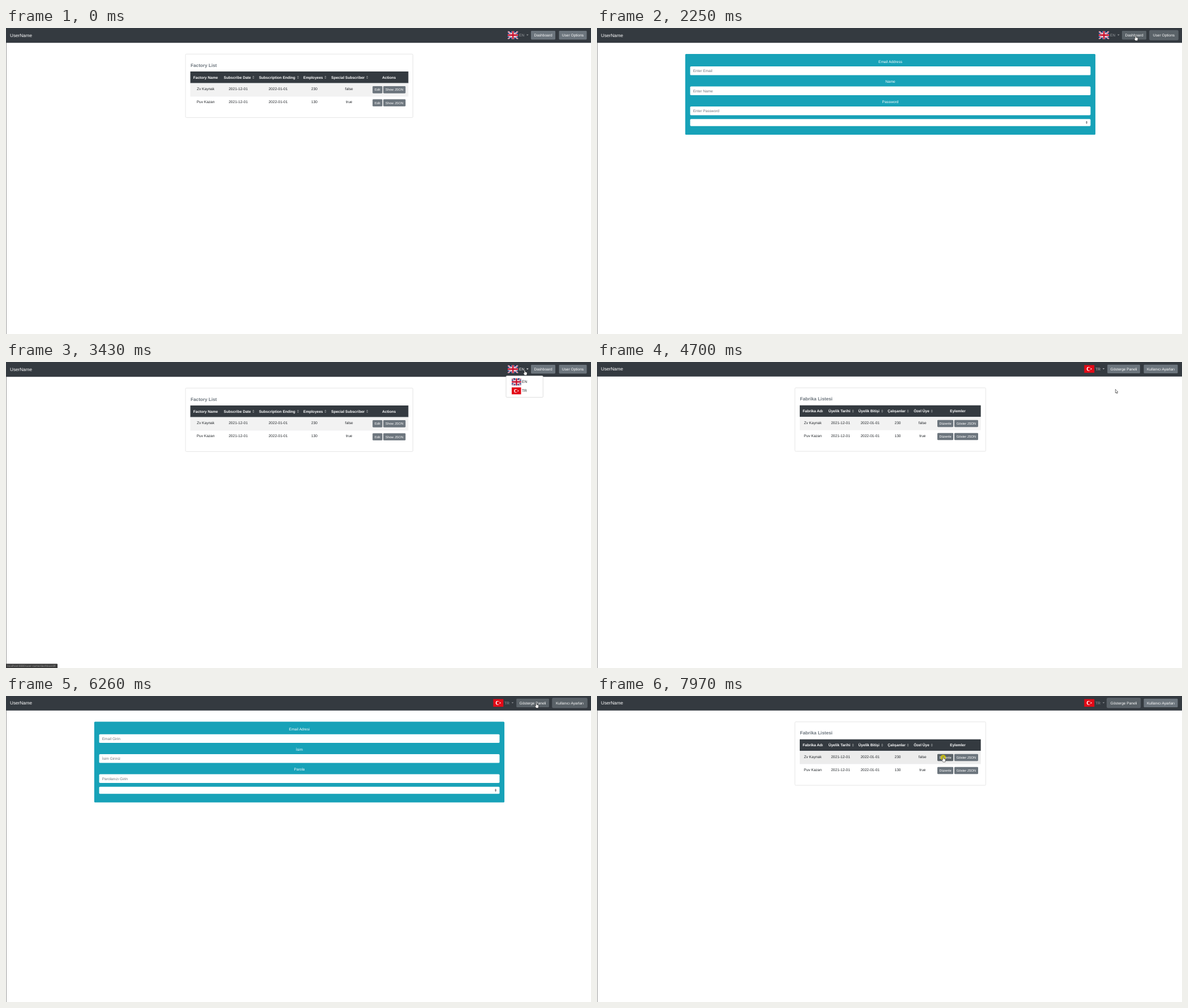
Write an HTML page with a canvas that moves like this. It is 1033 px wide and 542 px high and loops after 8 s.

```html
<!DOCTYPE html>
<html lang="en">
<head>
<meta charset="utf-8">
<title>Factory dashboard</title>
<style>
  html, body { margin: 0; width: 100%; height: 100%; overflow: hidden; background: #fff; }
  canvas { display: block; }
</style>
</head>
<body>
<canvas id="stage" width="1033" height="542"></canvas>
<script>
const ctx = document.getElementById('stage').getContext('2d');
ctx.textRendering = 'geometricPrecision';

const LOOP = 8000, SANS = '"Liberation Sans", Arial, sans-serif';
const DARK = '#343a40', GRAY = '#6c757d', ACTIVE = '#5a6268', INK = '#212529';
const BODY = 6.57, LARGE = 8.16, SMALL = 5.82;

const EN = {
  code: 'EN', dy: 0, flagX: 886, codeX: 906, caretX: 920.8,
  dashboard: ['Dashboard', 927, 43], options: ['User Options', 976.5, 49],
  card: [317, 401.5], table: [325.5, 385], title: 'Factory List',
  heads: [['Factory Name', 352.5], ['Subscribe Date', 408.5, 436.8], ['Subscription Ending', 478.8, 515.6],
    ['Employees', 542.4, 564], ['Special Subscriber', 603.8, 637.8], ['Actions', 676.3]],
  cells: [352.5, 410, 480.5, 544.5, 605.8],
  edit: ['Edit', 647.3, 17.3], json: ['Show JSON', 666.2, 39.3],
  form: [['Email Address', 'Enter Email'], ['Name', 'Enter Name'], ['Password', 'Enter Password']]
};
const TR = {
  code: 'TR', dy: -.45, flagX: 860.2, codeX: 880.3, caretX: 894.5,
  dashboard: ['Gösterge Paneli', 901.2, 57.7], options: ['Kullanıcı Ayarları', 965.5, 60],
  card: [349.5, 337], table: [358, 319.7], title: 'Fabrika Listesi',
  heads: [['Fabrika Adı', 381], ['Üyelik Tarihi', 428, 452], ['Üyelik Bitişi', 480.2, 503.6],
    ['Çalışanlar', 529, 549], ['Özel Üye', 573, 591.2], ['Eylemler', 637]],
  cells: [381, 430, 482.2, 531, 574.8],
  edit: ['Düzenle', 601, 28.2], json: ['Göster JSON', 631, 42],
  form: [['Email Adresi', 'Email Girin'], ['İsim', 'İsim Giriniz'], ['Parola', 'Parolanızı Girin']]
};
const ROWS = [
  ['Zv Kaynak', '2021-12-01', '2022-01-01', '230', 'false'],
  ['Puv Kazan', '2021-12-01', '2022-01-01', '130', 'true']
];

// Cursor moves: start, end, target x, target y, sideways bow
const START = [951, 533];
const MOVES = [
  [160, 960, 991, 13.5, 42], [1850, 2250, 951, 13.5, 0], [2860, 3260, 916, 14.5, 0],
  [3560, 3860, 915.4, 48.3, 0], [4700, 5180, 980.6, 15.8, 0], [5500, 6180, 938, 13.5, 0],
  [6230, 6260, 936.4, 12.4, 0], [7090, 7650, 917, 13, 0], [7730, 7930, 611.3, 108, 0]
];
const CLICKS = [1130, 2750, 3340, 3920, 5380, 6890, 7955];

const between = (t, a, b) => t >= a && t < b;
const ease = p => p * p * (3 - 2 * p);

function cursorAt(t) {
  let [x, y] = START;
  for (const [a, b, tx, ty, bow] of MOVES) {
    if (t < a) break;
    const p = ease(Math.min(1, (t - a) / (b - a)));
    x += (tx - x) * p + bow * Math.sin(Math.PI * p);
    y += (ty - y) * p;
  }
  return { x, y };
}

function rect(x, y, w, h, color, radius = 0) {
  ctx.fillStyle = color;
  ctx.beginPath();
  ctx.roundRect(x, y, w, h, radius);
  ctx.fill();
}

function outline(x, y, w, h, color, radius) {
  ctx.strokeStyle = color;
  ctx.lineWidth = .7;
  ctx.beginPath();
  ctx.roundRect(x, y, w, h, radius);
  ctx.stroke();
}

// y is the middle of the capitals
function text(str, x, y, color, { size = BODY, bold = false, align = 'center', font = SANS } = {}) {
  ctx.font = `${bold ? 'bold ' : ''}${size}px ${font}`;
  ctx.textAlign = align;
  ctx.fillStyle = color;
  ctx.fillText(str, x, y + size * .358);
}

function triangle(x, y, halfWidth, height, color) {
  ctx.fillStyle = color;
  ctx.beginPath();
  ctx.moveTo(x - halfWidth, y);
  ctx.lineTo(x + halfWidth, y);
  ctx.lineTo(x, y + height);
  ctx.fill();
}

function sorter(x, y, color, half, height) {
  triangle(x, y - .5, half, -height, color);
  triangle(x, y + .5, half, height, color);
}

function flag(code, x, y, w, h) {
  ctx.save();
  ctx.beginPath();
  ctx.rect(x, y, w, h);
  ctx.clip();
  ctx.translate(x + w / 2, y + h / 2);
  ctx.scale(w / 4, h / 3);
  const disc = (cx, r, color) => {
    ctx.fillStyle = color;
    ctx.beginPath();
    ctx.arc(cx, 0, r, 0, 7);
    ctx.fill();
  };
  if (code === 'TR') {
    rect(-2, -1.5, 4, 3, '#e30a17');
    disc(-.25, .75, '#fff');
    disc(-.05, .6, '#e30a17');
    ctx.fillStyle = '#fff';
    ctx.beginPath();
    for (let i = 0; i < 10; i++) {
      const r = i % 2 ? .14 : .36, a = Math.PI * (1 + i / 5);
      ctx.lineTo(.72 + r * Math.cos(a), r * Math.sin(a));
    }
    ctx.fill();
  } else {
    const lines = (color, width, ...paths) => {
      ctx.strokeStyle = color;
      ctx.lineWidth = width;
      for (const [x1, y1, x2, y2] of paths) {
        ctx.beginPath();
        ctx.moveTo(x1, y1);
        ctx.lineTo(x2, y2);
        ctx.stroke();
      }
    };
    const diagonals = [[-2, -1.5, 2, 1.5], [-2, 1.5, 2, -1.5]], cross = [[-2, 0, 2, 0], [0, -2, 0, 2]];
    rect(-2, -1.5, 4, 3, '#012169');
    lines('#fff', .55, ...diagonals);
    lines('#c8102e', .2, ...diagonals);
    lines('#fff', 1, ...cross);
    lines('#c8102e', .6, ...cross);
  }
  ctx.restore();
}

function draw(t) {
  const lang = t < 4000 ? EN : TR;
  const formOpen = between(t, 1190, 2830) || between(t, 5430, 6960);
  const menuOpen = between(t, 3390, 3980);
  const focus = between(t, 1130, 2750) || between(t, 5380, 6890) ? 'options'
    : between(t, 2750, 3340) || t >= 6890 ? 'dashboard'
    : between(t, 3340, 5380) ? 'language' : '';
  const tip = cursorAt(t);
  const visible = t >= 160;
  let overLink = false;

  const hit = (x, y, w, h) => visible && between(tip.x, x, x + w) && between(tip.y - lang.dy, y, y + h);
  const link = (...box) => {
    const over = hit(...box);
    overLink ||= over;
    return over;
  };
  const button = ([label, x, w], y, h, size, focused) => {
    const over = link(x, y, w, h);
    if (focused) rect(x - 1.3, y - 1.3, w + 2.6, h + 2.6, '#5b6269', 2.4);
    rect(x, y, w, h, over || focused ? ACTIVE : GRAY, 1.4);
    text(label, x + w / 2, y + h / 2, '#fff', { size });
  };

  const drawNav = () => {
    rect(0, -1, 1033, 27.2, DARK);
    text('UserName', 7, 12.9, '#fff', { size: LARGE, align: 'left' });
    const over = link(lang.flagX, 4, lang.caretX + 3 - lang.flagX, 18);
    const tone = menuOpen ? '#fff' : over || focus === 'language' ? '#ccced0' : '#999da0';
    flag(lang.code, lang.flagX, 5.8, 18.3, 13.8);
    text(lang.code, lang.codeX, 12.8, tone, { align: 'left' });
    triangle(lang.caretX, 11.6, 1.8, 1.9, tone);
    button(lang.dashboard, 5.1, 15.4, BODY, focus === 'dashboard');
    button(lang.options, 5.1, 15.4, BODY, focus === 'options');
  };

  const drawTable = () => {
    const [left, width] = lang.table;
    outline(lang.card[0], 46.2, lang.card[1], 112.4, '#dcdcdc', 1.6);
    text(lang.title, left + .6, 66, GRAY, { size: LARGE, bold: true, align: 'left' });
    rect(left, 77.1, width, 20.7, DARK);
    for (const [label, x, iconX] of lang.heads) {
      text(label, x, 87.2, '#fff', { bold: true });
      if (iconX) sorter(iconX, 87.4, '#85898c', 1.8, 2.3);
    }
    ROWS.forEach((row, i) => {
      const y = 97.8 + i * 23.1;
      const over = hit(left, y, width, 23.1);
      rect(left, y, width, 23.1, over ? '#ececec' : i ? '#fff' : '#f2f2f2');
      rect(left, y, width, .4, '#dee2e6');
      row.forEach((cell, c) => text(cell, lang.cells[c], y + 10, INK));
      button(lang.edit, y + 5.3, 12.6, SMALL);
      button(lang.json, y + 5.3, 12.6, SMALL);
    });
  };

  const drawForm = () => {
    rect(155.8, 46, 724.3, 143, '#17a2b8', 1.6);
    lang.form.forEach(([label, hint], i) => {
      const y = 68.1 + i * 35.45;
      text(label, 518, y - 8.6, '#fff');
      rect(164.5, y, 707, 15.4, '#fff', 1.6);
      text(hint, 169.7, y + 7.7, GRAY, { align: 'left' });
    });
    rect(164.5, 161.2, 707, 12.5, '#fff', 1.6);
    sorter(864.6, 167.3, DARK, 1.5, 1.8);
  };

  const drawMenu = () => {
    rect(883, 24.6, 65.3, 38, '#fff', 1.6);
    outline(883, 24.6, 65.3, 38, '#d0d0d0', 1.6);
    ['EN', 'TR'].forEach((code, i) => {
      const y = 27.6 + i * 15.8;
      if (link(883.4, y, 64.5, 15.8)) rect(883.4, y, 64.5, 15.8, '#f8f9fa');
      flag(code, 893, y + 1.5, 16.7, 12.5);
      text(code, 911, y + 7.4, INK, { align: 'left' });
    });
  };

  const drawCursor = () => {
    if (CLICKS.some(c => between(t, c, c + 75))) {
      ctx.fillStyle = 'rgba(222, 208, 0, .75)';
      ctx.beginPath();
      ctx.arc(tip.x, tip.y + .8, 4.8, 0, 7);
      ctx.fill();
    }
    ctx.save();
    ctx.translate(tip.x, tip.y);
    const shape = new Path2D(overLink
      ? 'M-.9 .8A.85.85 0 0 1 .8.8V3.1L3.4 3.7Q4.4 4 4.2 5.1L3.6 8.9H-.3L-2.5 5.6Q-2.7 4.5-1.6 4.8L-.9 5.4Z'
      : 'M0 0V6.7L1.5 5.3L2.5 7.6L3.5 7.2L2.5 4.9H4.6Z');
    ctx.fillStyle = '#fff';
    ctx.strokeStyle = '#111';
    ctx.lineWidth = .55;
    ctx.fill(shape);
    ctx.stroke(shape);
    ctx.restore();
  };

  rect(0, 0, 1033, 542, '#fff');
  rect(0, 26, 1, 516, '#9a9a9a');
  ctx.save();
  ctx.translate(0, lang.dy);
  drawNav();
  (formOpen ? drawForm : drawTable)();
  if (menuOpen) drawMenu();
  ctx.restore();
  if (between(t, 3270, 4080)) {
    rect(0, 534.4, 91, 8, '#3c3c3c', [0, 1.2, 0, 0]);
    text('localhost:8080/user-name/dashboard#', 2, 538.6, '#a5a5a5',
      { size: 4.72, align: 'left', font: '"Open Sans", sans-serif' });
  }
  if (visible) drawCursor();
}

const began = performance.now();
function tick() {
  draw((performance.now() - began) % LOOP);
  requestAnimationFrame(tick);
}
tick();
</script>
</body>
</html>
```
